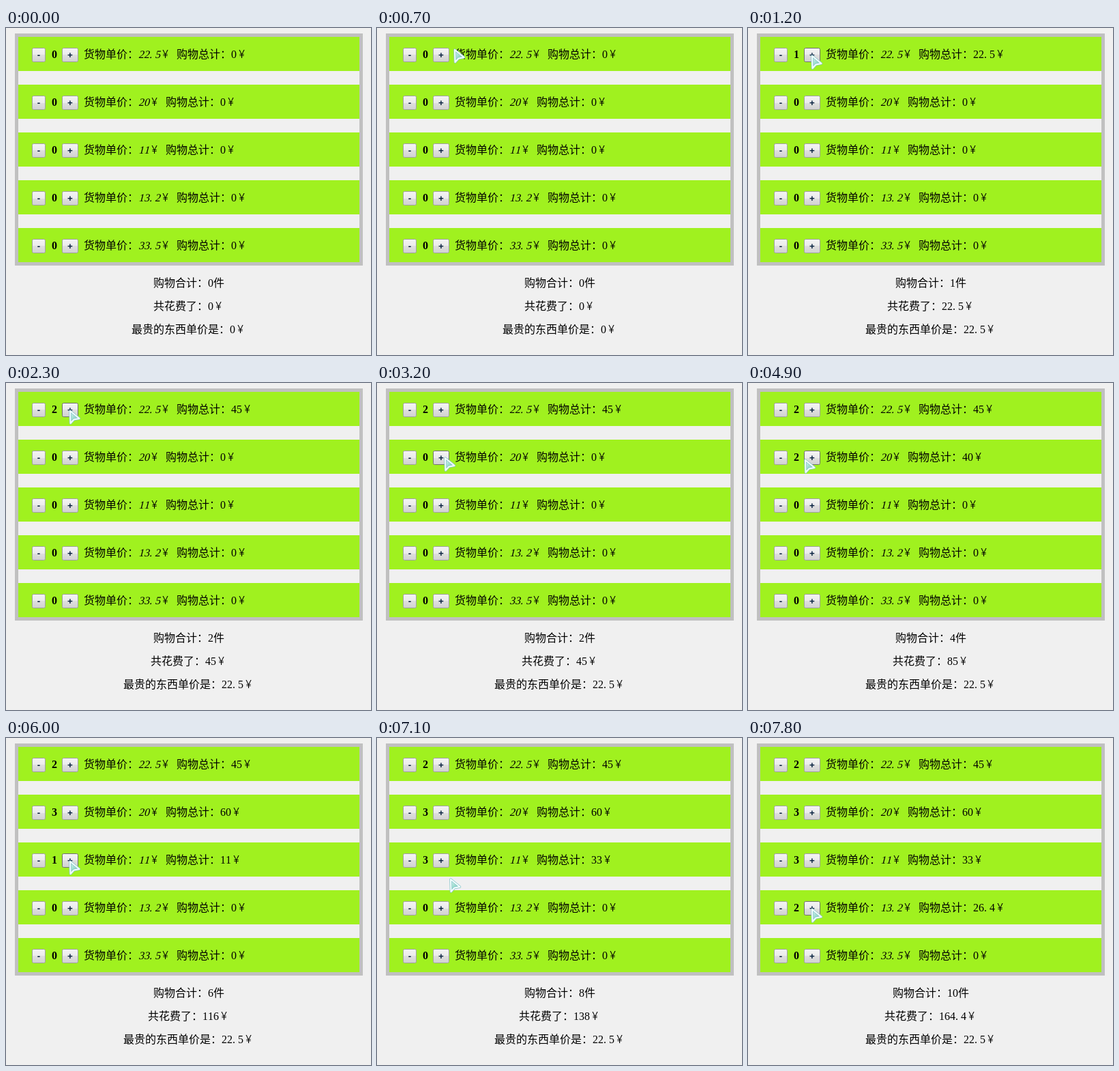
An HTML page with a canvas that plays this animation: 535 by 479 pixels, repeating every 8000 ms.

```html
<!DOCTYPE html>
<html lang="zh-CN">
<head>
<meta charset="utf-8">
<title>购物车</title>
<style>
  html, body { margin: 0; height: 100%; overflow: hidden; background: #f0f0f0; }
  canvas { display: block; }
</style>
</head>
<body>
<canvas id="stage" width="535" height="479"></canvas>
<script>
const ctx = document.getElementById('stage').getContext('2d');
const LOOP = 8000, STEP = 100, PITCH = 70;

// Each row: unit price and the times at which its "+" is clicked.
const GOODS = [
  { price: 22.5, clicks: [1200, 2300] },
  { price: 20, clicks: [3400, 4100, 5700] },
  { price: 11, clicks: [6000, 6300, 7000] },
  { price: 13.2, clicks: [7700, 7800] },
  { price: 33.5, clicks: [] }
];

const HAN = '300 16px "Noto Sans CJK SC", "Noto Sans CJK", sans-serif';
const LATIN = '16px "Liberation Serif", serif';
const YEN = '300 16px Inter, Roboto, sans-serif';
const BUTTON = 'bold 13.333px "Liberation Sans", sans-serif';

const isHan = ch => ch.charCodeAt(0) > 255;
const cellWidth = ch => isHan(ch) || ch === '¥' ? 16 : 8;
const textWidth = text => [...text].reduce((sum, ch) => sum + cellWidth(ch), 0);
const money = value => String(Math.round(value * 10) / 10) + '¥';

function drawGlyph(ch, x, baseline, font, slant = 0) {
  ctx.save();
  ctx.translate(x, baseline);
  ctx.transform(1, 0, -slant, 1, 0, 0);
  ctx.font = font;
  ctx.fillText(ch, 0, 0);
  ctx.restore();
}

// Half-width and full-width cells; returns the x after the text.
function drawText(text, x, baseline, { weight = 'normal', slant = 0 } = {}) {
  ctx.fillStyle = '#000';
  for (const ch of text) {
    const yen = ch === '¥';
    ctx.textAlign = yen ? 'center' : 'left';
    const font = yen ? YEN : isHan(ch) ? HAN : weight + ' ' + LATIN;
    drawGlyph(ch, yen ? x + 7.5 : x, baseline, font, slant);
    x += cellWidth(ch);
  }
  return x;
}

function drawCentered(text, baseline) {
  drawText(text, Math.round(267.5 - textWidth(text) / 2), baseline);
}

function drawButton(label, x, y, w, tip) {
  const h = 21;
  const hover = tip && tip.x >= x && tip.x < x + w && tip.y >= y && tip.y < y + h;
  const shade = ctx.createLinearGradient(0, y, 0, y + h);
  shade.addColorStop(0, '#f4f4f4');
  shade.addColorStop(0.5, '#ebebeb');
  shade.addColorStop(0.5, '#dfdfdf');
  shade.addColorStop(1, '#d1d1d1');
  ctx.beginPath();
  ctx.roundRect(x + 0.5, y + 0.5, w - 1, h - 1, 2);
  ctx.fillStyle = shade;
  ctx.fill();
  ctx.lineWidth = 1;
  ctx.strokeStyle = hover ? '#707070' : '#a0a0a0';
  ctx.stroke();
  ctx.textAlign = 'center';
  ctx.fillStyle = '#06203f';
  drawGlyph(label, x + w / 2, y + 15, BUTTON);
}

function drawRow(i, price, count, tip) {
  const y = 13 + i * PITCH, baseline = y + 31;
  ctx.fillStyle = '#a0f11f';
  ctx.fillRect(18, y, 500, 50);
  drawButton('-', 38, y + 16, 20, tip);
  drawText(String(count), 67, baseline, { weight: 'bold' });
  drawButton('+', 82, y + 16, 24, tip);
  let x = drawText('货物单价：', 114, baseline);
  x = drawText(String(price), x, baseline, { slant: 0.25 });
  drawText('¥ 购物总计：' + money(count * price), x, baseline);
}

// The pointer glides to each row in time for its first click,
// bowing to the right and slowing down on arrival.
function pointerAt(t) {
  if (t < 100) return null;
  if (t < 300) return { x: 47, y: 19 };
  let x = 92, y = 1, lastClick = 0;
  GOODS.forEach(({ clicks }, row) => {
    if (!clicks.length) return;
    const glide = Math.min(800, clicks[0] - lastClick);
    const k = Math.min(1, Math.max(0, 1 - (clicks[0] - t) / glide));
    x += 135 * k * (1 - k) ** 2;
    y += (39 + row * PITCH - y) * (1 - (1 - k) ** 3);
    lastClick = clicks.at(-1);
  });
  // A short stray to the left during the longest wait.
  const u = (t - 4200) / 1100;
  const stray = u > 0 && u < 1 ? Math.sin(Math.PI * u ** 4) : 0;
  return { x: Math.round(x - 20 * stray), y: Math.round(y + 5 * stray) };
}

function drawPointer({ x, y }) {
  ctx.save();
  ctx.translate(x, y);
  const fill = ctx.createLinearGradient(2, 4, 13, 18);
  fill.addColorStop(0, '#d5f4ee');
  fill.addColorStop(1, '#6cc8b4');
  ctx.beginPath();
  ctx.moveTo(2, 2);
  ctx.lineTo(2.5, 20);
  ctx.lineTo(7.5, 14.5);
  ctx.lineTo(15.5, 13);
  ctx.closePath();
  ctx.lineJoin = 'round';
  ctx.fillStyle = fill;
  ctx.fill();
  ctx.lineWidth = 3.5;
  ctx.strokeStyle = '#86c3cb';
  ctx.stroke();
  ctx.lineWidth = 2;
  ctx.strokeStyle = '#f4fffd';
  ctx.stroke();
  ctx.restore();
}

function draw(t) {
  const counts = GOODS.map(({ clicks }) => clicks.filter(time => time <= t).length);
  const items = counts.reduce((a, b) => a + b);
  const cost = counts.reduce((sum, n, i) => sum + n * GOODS[i].price, 0);
  const highest = Math.max(...counts.map((n, i) => n ? GOODS[i].price : 0));
  const tip = pointerAt(t);

  ctx.fillStyle = '#f0f0f0';
  ctx.fillRect(0, 0, 535, 479);
  ctx.lineWidth = 5;
  ctx.strokeStyle = '#c0c0c0';
  ctx.strokeRect(15.5, 10.5, 505, 335);
  GOODS.forEach(({ price }, i) => drawRow(i, price, counts[i], tip));
  drawCentered('购物合计：' + items + '件', 379);
  drawCentered('共花费了：' + money(cost), 413);
  drawCentered('最贵的东西单价是：' + money(highest), 447);
  if (tip) drawPointer(tip);
}

const start = performance.now();
function frame() {
  const t = (performance.now() - start) % LOOP;
  draw(Math.floor(t / STEP) * STEP);
  requestAnimationFrame(frame);
}
frame();
</script>
</body>
</html>
```
